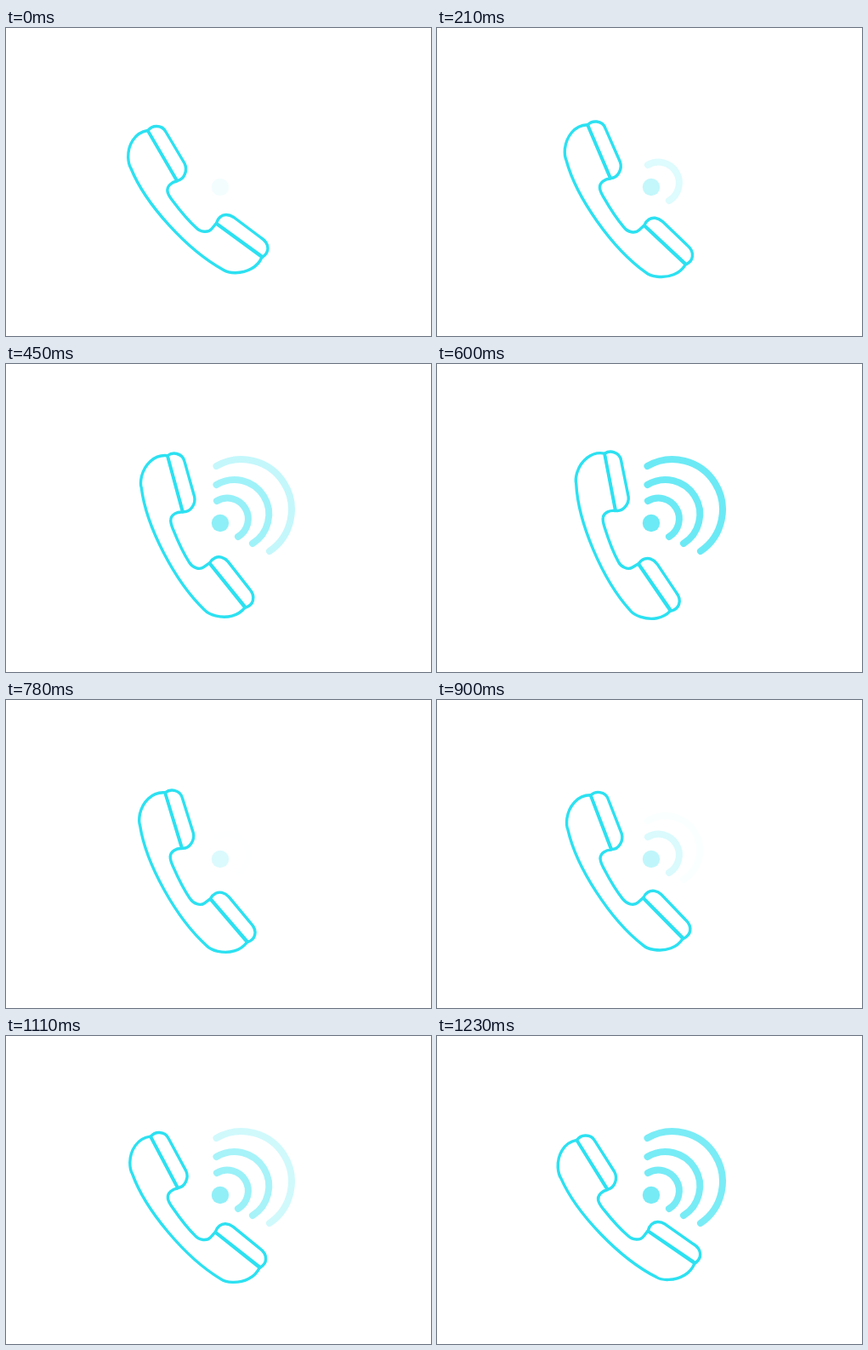
Animation of 500x362 px, one loop 1.26 s. Source, as an HTML page:

```html
<!DOCTYPE html>
<html lang="en">
<head>
<meta charset="utf-8">
<title>Ringing phone</title>
<style>
  html, body { margin: 0; width: 100%; height: 100%; overflow: hidden; background: #fff; }
  svg { display: block; width: 100%; height: 100%; }
</style>
</head>
<body>
<svg viewBox="0 0 500 362" fill="none" stroke="#2ce1f1" stroke-linecap="round" stroke-linejoin="round">
  <g id="phone" stroke-width="3.4">
    <path d="M166.500 120.500C151 123 143.500 138 143.700 152C144 158 145 162 147 165C164 207 213 261 256 284.500
      C260 287 264 287.800 270 287.700C284 287.500 296 281 301 269.500L247 230L242 236C238 241 229 240 224 235
      C214 226 205 215 196 203C193 199 190.500 196 190 192C189 186 195 181 201 180Z"/>
    <path d="M167 120.500C170 116.500 173 115.500 177 115.500C182 115.500 186 118 188 122L210 159C214 167 210 178 201.500 179.500Z"/>
    <path d="M247.500 229.500C249 223 254 219.500 259 219.500C262 219.500 265 220.500 268 222.500L300 246.500C307 251 308 256 308 259
      C308 264 305 267 302 269Z"/>
  </g>
  <g stroke-width="8">
    <circle class="wave" cx="252" cy="187" r="10.200" fill="#2ce1f1" stroke="none"/>
    <path class="wave" d="M248 161A24 24 0 0 1 273 203"/>
    <path class="wave" d="M247.500 142A40 40 0 0 1 290 211"/>
    <path class="wave" d="M247.500 120A59 59 0 0 1 310 220"/>
  </g>
</svg>
<script>
  const LOOP = 1260, STEP = 30, MEET = 620, STRENGTH = 0.66;
  const delays = [0, 158, 267, 425];
  const phone = document.getElementById('phone');
  const waves = document.querySelectorAll('.wave');

  function draw(now) {
    const step = Math.floor(now % LOOP / STEP);
    const time = step * STEP;

    // one degree per step, out and back
    const angle = Math.min(step, 39.3 - step);
    phone.setAttribute('transform', `rotate(${angle} 227 202)`);

    // later waves brighten faster until they meet the dot, then follow it
    const phase = time < 615 ? time + 57 : time - 620;
    waves.forEach((wave, i) => {
      const own = (phase - delays[i]) / (MEET - delays[i]);
      wave.setAttribute('opacity', Math.max(0, STRENGTH * Math.min(own, phase / MEET)));
    });
  }

  const start = performance.now();
  function tick() {
    draw(performance.now() - start);
    requestAnimationFrame(tick);
  }
  tick();
</script>
</body>
</html>
```
